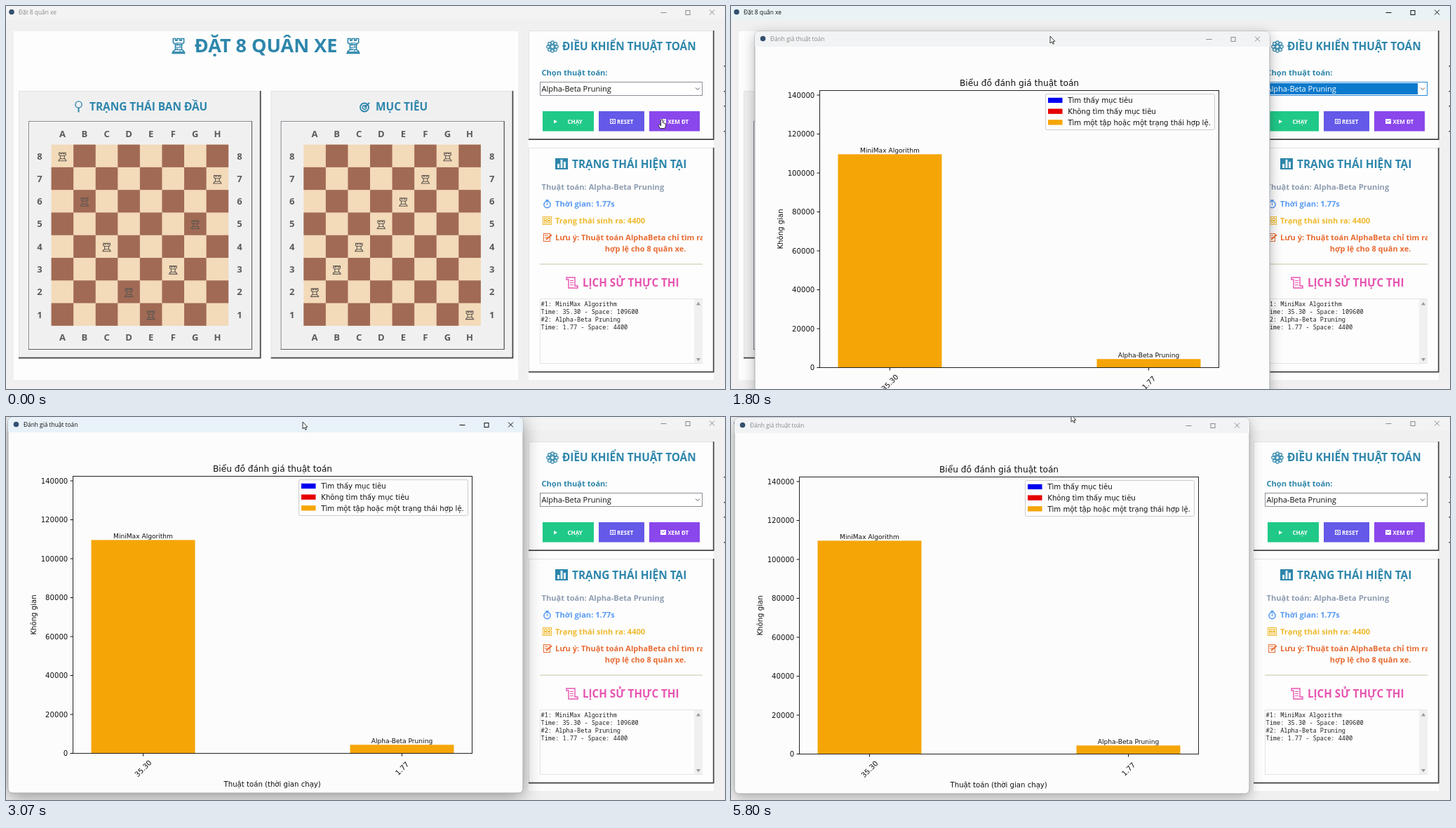
Animation, 1025 px wide and 546 px high, one loop 5.83 s. Source, as an HTML page with a canvas:

```html
<!DOCTYPE html>
<html lang="vi">
<head>
<meta charset="utf-8">
<title>Đặt 8 quân xe</title>
<style>
html, body { margin: 0; width: 100%; height: 100%; overflow: hidden; background: #f0f0f0; }
canvas { display: block; }
</style>
</head>
<body>
<canvas id="stage" width="1025" height="546"></canvas>
<script>
const c = document.getElementById('stage').getContext('2d');
const LOOP = 5830;
const UI = '"Open Sans", "Noto Sans", sans-serif';
const PLOT = '"DejaVu Sans", sans-serif';
const MONO = '"Noto Sans Mono", "DejaVu Sans Mono", monospace';
const TEAL = '#2e86ab', ORANGE = '#f5a506', PAPER = '#fcfcfc', ICON = '#33506e';

// Time keys: [ms, x, y]
const cursorKeys = [[0, 935, 162], [280, 935, 162], [570, 907, 176], [1150, 590, 70], [1700, 455, 43],
  [1850, 455, 43], [2500, 434, 13], [3070, 423, 7], [3300, 425, 8], [3500, 425, 8],
  [3930, 394, 108], [4700, 394, 108], [5600, 485, -3], [LOOP, 485, -3]];
const windowKeys = [[0, 34, 36], [1850, 34, 36], [2500, 14, 6], [3070, 3, 0], [3300, 5, 1], [LOOP, 5, 1]];

function at(keys, t) {
  const i = Math.max(1, keys.findIndex(k => k[0] >= t));
  const [t0, x0, y0] = keys[i - 1], [t1, x1, y1] = keys[i];
  const p = (t - t0) / (t1 - t0), e = p * p * (3 - 2 * p);
  return [x0 + (x1 - x0) * e, y0 + (y1 - y0) * e];
}

function rect(x, y, w, h, color) { c.fillStyle = color; c.fillRect(x, y, w, h); }

function frame(x, y, w, h, color) {
  c.strokeStyle = color; c.lineWidth = 1;
  c.strokeRect(x + .5, y + .5, w - 1, h - 1);
}

function line(color, width, ...points) {
  c.strokeStyle = color; c.lineWidth = width;
  c.beginPath();
  points.forEach(([x, y]) => c.lineTo(x, y));
  c.stroke();
}

function polygon(points, fill, stroke, width = 1) {
  c.beginPath();
  points.forEach(([x, y]) => c.lineTo(x, y));
  c.closePath();
  if (fill) { c.fillStyle = fill; c.fill(); }
  if (stroke) { c.strokeStyle = stroke; c.lineWidth = width; c.stroke(); }
}

function circle(x, y, r, fill, stroke, width = 1) {
  c.beginPath(); c.arc(x, y, r, 0, 7);
  if (fill) { c.fillStyle = fill; c.fill(); }
  if (stroke) { c.strokeStyle = stroke; c.lineWidth = width; c.stroke(); }
}

function text(s, x, y, size, color, align = 'left', weight = 700, family = UI) {
  c.font = `${weight} ${size}px ${family}`;
  c.fillStyle = color; c.textAlign = align;
  c.fillText(s, x, y);
}

const plotText = (s, x, y, size = 10.15, align = 'center') => text(s, x, y, size, '#111', align, 400, PLOT);

function turned(s, x, y, angle) {
  c.save(); c.translate(x, y); c.rotate(angle);
  plotText(s, 0, 3.7);
  c.restore();
}

// Panel with raised border
function panel(x, y, w, h, fill) {
  rect(x, y, w, h, fill);
  frame(x, y, w, h, '#e2e2e6');
  line('#444', 1.7, [x, y + h - .8], [x + w - .8, y + h - .8], [x + w - .8, y]);
}

function captionButtons(x, y, color) {
  line(color, 1, [x - 4, y + .5], [x + 4, y + .5]);
  frame(x + 31, y - 3, 7, 7, color);
  line(color, 1, [x + 65.5, y - 3.5], [x + 72.5, y + 3.5]);
  line(color, 1, [x + 65.5, y + 3.5], [x + 72.5, y - 3.5]);
}

function rook(x, y, w, h, color, bricks) {
  const half = [[.1, -.5], [.1, -.37], [.22, -.37], [.22, -.5], [.4, -.5], [.4, -.22], [.24, -.12], [.24, .24], [.4, .36], [.46, .5]];
  const right = half.map(([a, b]) => [x + a * w, y + b * h]);
  const left = half.map(([a, b]) => [x - a * w, y + b * h]).reverse();
  polygon([...right, ...left], null, color, bricks ? 1.6 : 1.1);
  for (const k of [-.12, .25]) line(color, 1, [x - .24 * w, y + k * h], [x + .24 * w, y + k * h]);
  if (!bricks) return;
  for (let i = 0; i < 4; i++) {
    const by = y + (-.2 + i * .15) * h, bx = x + (i % 2 ? 2 : -2);
    line(color, 1, [x - .25 * w, by], [x + .25 * w, by]);
    line(color, 1, [bx, by], [bx, by + .15 * h]);
  }
  line(color, 2, [x - .42 * w, y + .42 * h], [x + .42 * w, y + .42 * h]);
}

function board(x, heading, headingX, columns) {
  panel(x, 121, 345.5, 381.5, '#f0f0f1');
  text(heading, headingX, 149.3, 15.4, TEAL);
  frame(x + 15, 165, 318, 326, '#fff');
  frame(x + 14, 164, 319, 326, '#84848c');
  line('#555', 1, [x + 14, 489.5], [x + 332.5, 489.5], [x + 332.5, 164]);
  const left = x + 46.6, top = 197.6, cw = 31.57, ch = 32.28;
  rect(left, top, 8 * cw, 8 * ch, '#f3dab8');
  for (let r = 0; r < 8; r++) {
    for (let k = 1 - r % 2; k < 8; k += 2) rect(left + k * cw, top + r * ch, cw, ch, '#a16a54');
    const cx = left + (r + .5) * cw, cy = top + (r + .5) * ch;
    for (const y of [186.5, 477]) text('ABCDEFGH'[r], cx, y, 13, '#5a5a5a', 'center');
    for (const dx of [30, 315]) text(8 - r, x + dx, cy + 4.8, 13, '#5a5a5a', 'center');
    rook(left + (columns[r] + .5) * cw, cy + 1.2, 12, 11.5, '#5c5650');
  }
}

function button(x, w, color, label, labelX) {
  rect(x, 150, w, 28.5, color);
  text(label, labelX, 167.5, 8, '#fff');
}

function sideIcons() {
  for (let i = 0; i < 8; i++) circle(779 + 6 * Math.cos(i * Math.PI / 4), 58 + 6 * Math.sin(i * Math.PI / 4), 2.2, null, TEAL, 1.2);
  circle(779, 58, 2.6, null, TEAL, 1.3);
  rect(783, 217, 18, 16, TEAL);
  [[786, 6], [790.5, 12], [795, 9]].forEach(([x, h]) => rect(x, 231 - h, 3, h, '#e8f2f6'));
  circle(771.5, 283, 4.6, null, '#5b9bf3', 1.6);
  line('#5b9bf3', 1.4, [771.5, 284], [771.5, 280.5]);
  rect(769.5, 276, 4, 2, '#5b9bf3');
  frame(765, 300, 13, 12, '#efb92c');
  for (let i = 0; i < 4; i++) frame(767 + (i % 2) * 5, 302 + (i >> 1) * 4, 4, 4, '#efb92c');
  frame(766, 324, 10, 12, '#e86c34');
  line('#e86c34', 2, [770, 333], [778, 326]);
  for (const y of [327, 330]) line('#e86c34', 1, [768, y], [773, y]);
  polygon([[799, 387], [811, 387], [811, 399], [815, 399], [815, 402], [802, 402], [802, 390], [799, 390]], null, '#e754b0', 1.4);
  for (const y of [391.5, 394.5, 397.5]) line('#e754b0', 1, [804, y], [809, y]);
}

function mainWindow(active) {
  const ink = active ? '#111' : '#8a8a8a';
  rect(0, 0, 1025, 546, '#f0f0f0');
  rect(0, 0, 1025, 19, active ? '#e9f3f6' : '#f3f3f3');
  circle(8, 8.5, 3.8, ICON);
  text('Đặt 8 quân xe', 18, 12, 8.4, ink, 'left', 400);
  captionButtons(937.5, 9, ink);
  for (const y of [85, 121, 142, 178]) rect(1023.5, y, 1.5, 1.5, '#333');

  rect(11, 36, 719, 497, '#fdfdfd');
  text('ĐẶT 8 QUÂN XE', 370.5, 66, 27, TEAL, 'center');
  rook(246, 57, 19, 21, TEAL, true);
  rook(495, 57, 19, 21, TEAL, true);
  board(18, 'TRẠNG THÁI BAN ĐẦU', 119, [0, 7, 1, 6, 2, 5, 3, 4]);
  board(377.7, 'MỤC TIÊU', 527, [6, 5, 4, 3, 2, 1, 0, 7]);
  circle(103.5, 140.5, 4.6, null, TEAL, 1.4);
  line(TEAL, 2, [103.5, 145], [103.5, 151.5]);
  circle(511, 144.5, 6, null, TEAL, 1.8);
  circle(511, 144.5, 2.7, null, TEAL, 1.5);
  line(TEAL, 2, [511, 144.5], [518, 138]);

  rect(745, 35, 264, 498, '#fdfdfd');
  panel(745, 35, 264.5, 156, '#fdfdfd');
  panel(745, 202, 264.5, 320.5, '#fdfdfd');
  text('ĐIỀU KHIỂN THUẬT TOÁN', 793, 63.3, 15.35, TEAL);
  text('Chọn thuật toán:', 763.5, 99, 11.1, TEAL);

  rect(761, 108, 232, 20, '#fff');
  frame(761, 108, 232, 20, active ? '#2a8ad4' : '#8d8d98');
  if (active) rect(763, 110, 216, 16, '#0b79cc');
  text('Alpha-Beta Pruning', 763.5, 122.4, 11, active ? '#fff' : '#111', 'left', 400);
  line('#555', 1, [983, 116.5], [986, 119.5], [989, 116.5]);

  button(765, 73, '#20c987', 'CHẠY', 800.5);
  polygon([[781, 162], [786, 164.7], [781, 167.4]], '#fff');
  button(845, 65, '#6459e8', 'RESET', 871);
  frame(861, 161, 8, 7, '#fff');
  circle(865, 164.5, 1.5, null, '#fff');
  button(917, 72, '#8a47ec', 'XEM ĐT', 943.5);
  rect(933, 161, 8, 7, '#fff');
  line('#8a47ec', 1, [934.5, 163], [937, 165], [939.5, 162.5]);

  sideIcons();
  text('TRẠNG THÁI HIỆN TẠI', 807, 230.6, 15.4, TEAL);
  text('Thuật toán: Alpha-Beta Pruning', 763.5, 261.5, 11.1, '#8e9db0');
  text('Thời gian: 1.77s', 783, 285.8, 11.1, '#5b9bf3');
  text('Trạng thái sinh ra: 4400', 783, 310, 11.1, '#efb92c');
  c.save();
  c.beginPath(); c.rect(761, 320, 232, 40); c.clip();
  text('Lưu ý: Thuật toán AlphaBeta chỉ tìm ra', 783, 334, 11, '#e86c34');
  text('hợp lệ cho 8 quân xe.', 911.5, 349.5, 11, '#e86c34', 'center');
  c.restore();
  rect(761, 367.5, 232, 1, '#c6c6a4');
  text('LỊCH SỬ THỰC THI', 822, 400, 15.2, '#e754b0');

  frame(761, 417, 232, 93, '#e4e4ea');
  rect(981, 418, 12, 91, '#f0f0f0');
  polygon([[984, 426.5], [990, 426.5], [987, 422]], '#9a9a9a');
  polygon([[984, 502], [990, 502], [987, 506.5]], '#9a9a9a');
  ['#1: MiniMax Algorithm', 'Time: 35.30 - Space: 109600', '#2: Alpha-Beta Pruning', 'Time: 1.77 - Space: 4400']
    .forEach((s, i) => text(s, 762.5, 427.5 + i * 11, 8.6, '#222', 'left', 400, MONO));
}

function chartWindow(active) {
  const ink = active ? '#111' : '#8a8a8a', w = 734, h = 536;
  c.save();
  c.shadowColor = `rgba(0,0,0,${active ? .4 : .3})`;
  c.shadowBlur = active ? 26 : 18;
  c.shadowOffsetY = 5;
  c.beginPath(); c.roundRect(0, 0, w, h, 6);
  c.fillStyle = PAPER; c.fill();
  c.restore();
  c.save();
  c.beginPath(); c.roundRect(0, 0, w, h, 6);
  c.strokeStyle = '#a5abb2'; c.lineWidth = 1; c.stroke();
  c.clip();
  rect(0, 0, w, 22, active ? '#e8f2f8' : '#f2f3f4');
  c.restore();
  circle(11.5, 10.5, 3.8, ICON);
  text('Đánh giá thuật toán', 22, 14, 8.35, ink, 'left', 400);
  captionButtons(647.5, 11, ink);

  const left = 92.5, right = 661.5, top = 84.5, base = 479.5;
  const yOf = value => base - value * 55.5 / 20000;
  plotText('Biểu đồ đánh giá thuật toán', 377, 77.5, 12.15);
  [['MiniMax Algorithm', 109600, '35.30', 192.5], ['Alpha-Beta Pruning', 4400, '1.77', 561.5]].forEach(([name, space, time, x]) => {
    const y = yOf(space);
    rect(x - 74, y, 148, base - y, ORANGE);
    plotText(name, x, y - 2, 9.1);
    line('#111', 1, [x, base], [x, base + 4]);
    turned(time, x, 501, -Math.PI / 4);
  });
  c.strokeStyle = '#222'; c.lineWidth = 1;
  c.strokeRect(left, top, right - left, base - top);
  for (let v = 0; v <= 140000; v += 20000) {
    line('#111', 1, [left - 4, yOf(v)], [left, yOf(v)]);
    plotText(v, 85.3, yOf(v) + 3.8, 10.15, 'right');
  }
  plotText('Thuật toán (thời gian chạy)', 376.7, 526.8);
  turned('Không gian', 36.3, 282, -Math.PI / 2);

  c.beginPath(); c.roundRect(414.5, 89.5, 241, 51, 2);
  c.fillStyle = PAPER; c.fill();
  c.strokeStyle = '#cdcdc8'; c.lineWidth = 1; c.stroke();
  [['#0000f0', 'Tìm thấy mục tiêu'], ['#e60000', 'Không tìm thấy mục tiêu'], [ORANGE, 'Tìm một tập hoặc một trạng thái hợp lệ.']]
    .forEach(([color, s], i) => {
      const y = 98.5 + i * 15.7;
      rect(418, y - 3.7, 20.5, 7.3, color);
      plotText(s, 446.3, y + 3.6, 10.15, 'left');
    });
}

function pointer(x, y, hand) {
  const arrow = [[0, 0], [0, 10], [2.3, 8], [4, 11.3], [5.4, 10.7], [4, 7.5], [6.8, 7.2]];
  const fingers = [[-1.4, 0], [1.2, 0], [1.4, 4.5], [5.4, 5.6], [5.6, 9], [4, 12.5], [-2.5, 12.5], [-5, 8], [-3.6, 7], [-1.4, 8.6]];
  c.save();
  c.translate(x, y); c.lineJoin = 'round';
  polygon(hand ? fingers : arrow, '#fff', '#222', .9);
  c.restore();
}

function draw(now) {
  const t = now % LOOP;
  const mainActive = t >= 150 && t < 1860;
  const chartActive = t >= 1860 && t < 5000;
  mainWindow(mainActive);
  const open = Math.min(1, (t - 450) / 150);
  if (open > 0) {
    const ease = 1 - (1 - open) ** 2, scale = .9 + .1 * ease;
    const [x, y] = at(windowKeys, t);
    c.save();
    c.globalAlpha = Math.min(1, open * 1.5);
    c.translate(x + 367, y + 268);
    c.scale(scale, scale);
    c.translate(-367, -268);
    chartWindow(chartActive);
    c.restore();
  }
  pointer(...at(cursorKeys, t), t < 630);
  requestAnimationFrame(draw);
}
requestAnimationFrame(draw);
</script>
</body>
</html>
```
